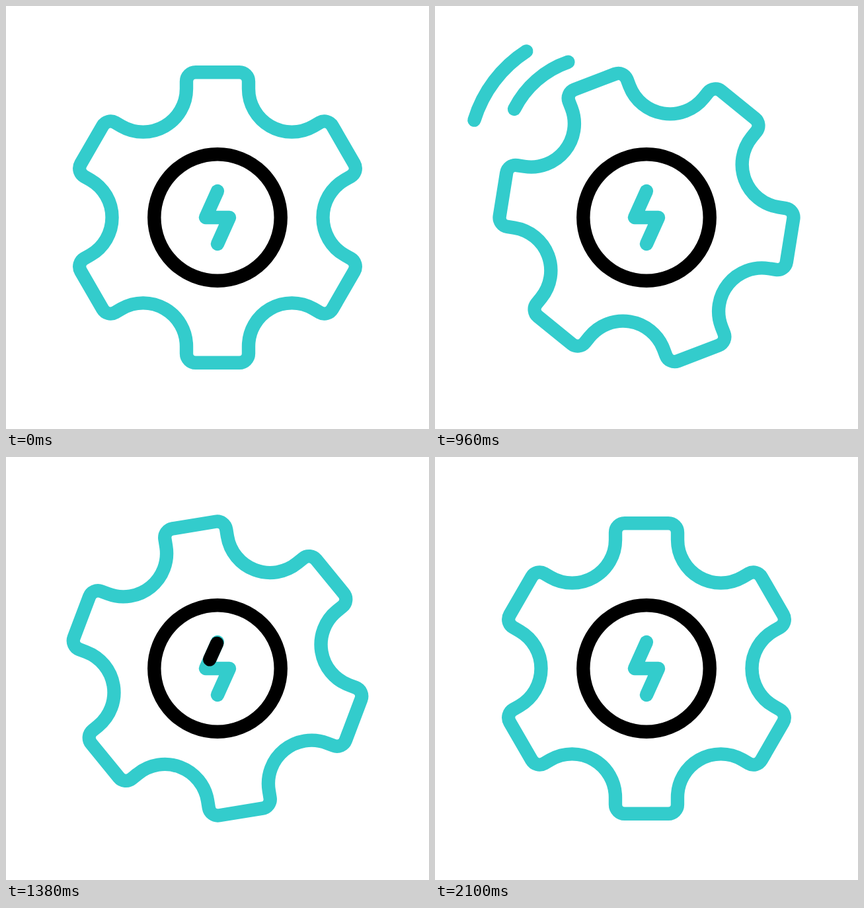
Animation, 640 px wide and 640 px high, one loop 3000 ms. Source, as an HTML page:

```html
<!DOCTYPE html>
<html lang="en">
<head>
<meta charset="utf-8">
<title>Energy gear</title>
<style>
  html, body { margin: 0; width: 100%; height: 100%; overflow: hidden; background: #fff; }
  svg { display: block; width: 100%; height: 100%; }
  svg * { fill: none; stroke-width: 20.4; stroke-linecap: round; stroke-linejoin: round; }
  .teal { stroke: #33cccc; }
  .black { stroke: #000; }
</style>
</head>
<body>
<svg viewBox="0 0 640 640">
  <path id="outer" class="teal" pathLength="100" d="M55 190A190 190 0 0 1 149 62"/>
  <path id="inner" class="teal" pathLength="100" d="M120 156A143 143 0 0 1 248 77"/>
  <path id="gear" class="teal"/>
  <circle class="black" cx="320" cy="320" r="95.7"/>
  <path class="teal" d="M320 280L302 320H338L320 360"/>
  <path id="charge" class="black" pathLength="100" d="M320 360L338 320H302L320 280"/>
</svg>
<script>
const LOOP = 3000, STEP = 20;
const $ = id => document.getElementById(id);
const clamp = x => Math.min(1, Math.max(0, x));
const smooth = x => x * x * (3 - 2 * x);

// Ease with flat ends; x1 and x2 set how long each end lingers.
function ease(x, x1 = 1 / 3, x2 = 2 / 3) {
  let lo = 0, hi = 1;
  for (let i = 0; i < 24; i++) {
    const s = (lo + hi) / 2, r = 1 - s;
    if (3 * r * r * s * x1 + 3 * r * s * s * x2 + s * s * s < x) lo = s; else hi = s;
  }
  return smooth(lo);
}

// One tooth and the valley after it, repeated six times around the centre.
function gearPath() {
  const tooth = [[-47, -194.9], [-47, -205.8], [-33, -219.8], [33, -219.8], [47, -205.8], [47, -194.9]];
  let d = '';
  for (let i = 0; i <= 6; i++) {
    const a = i * Math.PI / 3, c = Math.cos(a), s = Math.sin(a);
    const [p, q, r, t, u, v] = tooth.map(([x, y]) =>
      (x * c - y * s).toFixed(2) + ' ' + (x * s + y * c).toFixed(2));
    d += i ? `A65.5 65.5 0 0 0 ${p}` : `M${p}`;
    if (i < 6) d += `L${q}A14 14 0 0 1 ${r}L${t}A14 14 0 0 1 ${u}L${v}`;
  }
  return d + 'Z';
}

// start, end, from, to, x1, x2
const SPIN = [
  [300, 503, 0, -10],
  [503, 1518, -10, 250, 0.26, 0.77],
  [1518, 2110, 250, 240, 0.533, 0.7]
];

function angleAt(t) {
  const [t0, t1, from, to, x1, x2] = SPIN.find(k => t < k[1]) || SPIN[2];
  return from + (to - from) * ease(clamp((t - t0) / (t1 - t0)), x1, x2);
}

// id, head start, tail start, duration
const TRIMS = [
  ['outer', 754, 909, 248],
  ['inner', 802, 957, 248],
  ['charge', 1065, 1146, 341]
];

function trim([id, headStart, tailStart, span], t) {
  const at = start => 100 * smooth(clamp((t - start) / span));
  const head = at(headStart), tail = at(tailStart), el = $(id);
  el.style.display = head - tail > 0.05 ? '' : 'none';
  el.style.strokeDasharray = `${head - tail} 200`;
  el.style.strokeDashoffset = -tail;
}

function draw(now) {
  const t = Math.floor((now - begin) % LOOP / STEP) * STEP;
  $('gear').setAttribute('transform', `translate(320 320) rotate(${angleAt(t)})`);
  TRIMS.forEach(k => trim(k, t));
}

function tick() {
  draw(performance.now());
  requestAnimationFrame(tick);
}

$('gear').setAttribute('d', gearPath());
const begin = performance.now();
tick();
</script>
</body>
</html>
```
